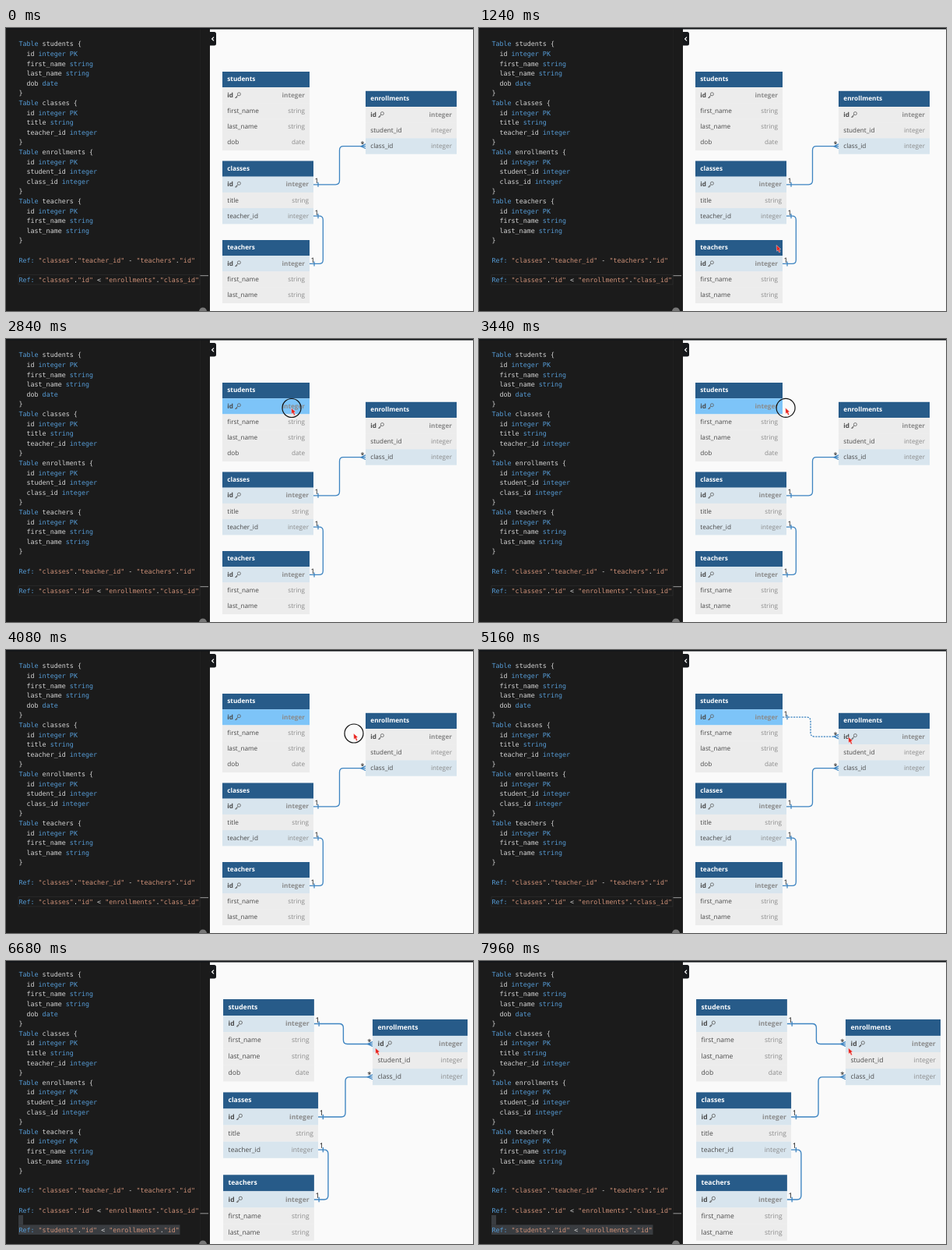
An HTML page for the animation above (8 s loop, 600 px wide and 363 px high).

```html
<!DOCTYPE html>
<html lang="en">
<head>
<meta charset="utf-8">
<title>Schema editor</title>
<style>
  html, body { margin: 0; width: 100%; height: 100%; overflow: hidden; background: #fafafa; }
  svg { display: block; width: 100vw; height: 100vh; }
  text { white-space: pre; text-rendering: geometricPrecision; }
  .code { font: 8.37px "DejaVu Sans Mono", monospace; fill: #d4d4d4; }
  .key { fill: #569cd6; }
  .str { fill: #ce9178; }
  .table text { font: 8.2px "Open Sans", "Noto Sans", sans-serif; fill: #484848; }
  .table .type { fill: #8b8b8b; text-anchor: end; }
  .table .bold { font-weight: 700; }
  .table .title { font-weight: 700; fill: #fff; }
  .wire { fill: none; stroke: #3d84c1; stroke-width: 1.3; }
  .mark { font: 9px "Open Sans", "Noto Sans", sans-serif; fill: #111; text-anchor: middle; }
</style>
</head>
<body>
<svg id="stage" viewBox="0 0 600 363" preserveAspectRatio="none"></svg>
<script>
const LOOP = 8000, ROW = 20.2, LINE = 12.6;
const T = { enter: 960, hover: 1640, press: 2680, target: 4400, drop: 5120, update: 5280 };
const PLAIN = '#ececec', LINKED = '#d8e5ee', ACTIVE = '#7dc4f8';

const stage = document.getElementById('stage');

function add(parent, tag, attrs = {}, text) {
  const el = document.createElementNS('http://www.w3.org/2000/svg', tag);
  for (const k in attrs) el.setAttribute(k, attrs[k]);
  if (text !== undefined) el.textContent = text;
  parent.appendChild(el);
  return el;
}
const rect = (p, x, y, width, height, fill, more) =>
  add(p, 'rect', { x, y, width, height, fill, ...more });
const show = (el, on) => el.setAttribute('visibility', on ? 'visible' : 'hidden');

// Schema
const tables = [
  { name: 'students', x: 278, y: 56, w: 112,
    rows: ['id integer PK', 'first_name string', 'last_name string', 'dob date'], linked: [] },
  { name: 'classes', x: 278, y: 170.5, w: 117,
    rows: ['id integer PK', 'title string', 'teacher_id integer'], linked: [0, 2] },
  { name: 'enrollments', x: 462, y: 80.8, w: 117,
    rows: ['id integer PK', 'student_id integer', 'class_id integer'], linked: [2] },
  { name: 'teachers', x: 278, y: 272, w: 112,
    rows: ['id integer PK', 'first_name string', 'last_name string'], linked: [0] }
];

// Diagram
rect(stage, 262, 0, 338, 363, '#fafafa');
const diagram = add(stage, 'g');

function drawKey(p, x, y) {
  const g = add(p, 'g', { fill: 'none', stroke: '#5c5c5c', 'stroke-width': 0.8 });
  add(g, 'circle', { cx: x + 4.9, cy: y - 1.4, r: 2 });
  add(g, 'path', { d: `M${x + 3.4} ${y}L${x} ${y + 3.4}h1.6v-1.4h1.4` });
}

function drawTable({ name, x, y, w, rows, linked }) {
  const g = add(diagram, 'g', { class: 'table' });
  rect(g, x, y, w, ROW, '#275b89');
  add(g, 'text', { x: x + 6.3, y: y + 12.4, class: 'title' }, name);
  return rows.map((row, i) => {
    const [field, type, pk] = row.split(' ');
    const top = y + ROW * (i + 1), bold = pk ? ' bold' : '';
    const bg = rect(g, x, top, w, ROW + 0.1, linked.includes(i) ? LINKED : PLAIN);
    add(g, 'text', { x: x + 6.3, y: top + 12.6, class: 'field' + bold }, field);
    add(g, 'text', { x: x + w - 6, y: top + 12.6, class: 'type' + bold }, type);
    if (pk) drawKey(g, x + 16.5, top + 10);
    return bg;
  });
}
const rowBoxes = tables.map(drawTable);
const startRow = rowBoxes[0][0], endRow = rowBoxes[2][0];

const tick = (g, x, y) => {
  add(g, 'path', { class: 'wire', d: `M${x + 6} ${y - 3}v6` });
  add(g, 'text', { class: 'mark', x: x + 4.2, y: y - 1.6 }, '1');
};
const manyEnd = (g, x, y) => {
  add(g, 'path', { class: 'wire', d: `M${x} ${y - 2.8}L${x - 6} ${y}L${x} ${y + 2.8}` });
  add(g, 'text', { class: 'mark', x: x - 4, y: y + 0.6 }, '*');
};

// Horizontal - vertical - horizontal wire with rounded corners
function wire(g, x1, y1, xm, x2, y2, r = 5) {
  const v = Math.sign(y2 - y1), a = Math.sign(xm - x1), b = Math.sign(x2 - xm);
  return add(g, 'path', { class: 'wire', d:
    `M${x1} ${y1}H${xm - a * r}Q${xm} ${y1} ${xm} ${y1 + v * r}` +
    `V${y2 - v * r}Q${xm} ${y2} ${xm + b * r} ${y2}H${x2}` });
}
function oneToMany(x1, y1, x2, y2) {
  const g = add(diagram, 'g');
  const path = wire(g, x1, y1, (x1 + x2) / 2, x2, y2);
  tick(g, x1, y1);
  manyEnd(g, x2, y2);
  return { g, path };
}
oneToMany(395, 200.8, 462, 151.7);
const oneToOne = add(diagram, 'g');
wire(oneToOne, 395, 241.2, 407.3, 390, 302.4);
tick(oneToOne, 395, 241.2);
tick(oneToOne, 390, 302.4);
const newRef = oneToMany(390, 86.2, 462, 111.1);

// Editor
const editor = add(stage, 'g');
rect(editor, 0, 0, 262, 363, '#1b1b1b');
rect(editor, 249, 0, 0.6, 363, '#262626');
const lineBorder = rect(editor, 16, 316.6, 233, 12.4, 'none', { stroke: '#2b2b2b', 'stroke-width': 0.8 });
const selection = add(editor, 'g');
rect(selection, 16, 326, 6, 12.6, '#3a3d41');
rect(selection, 16, 338.4, 207.5, 12.6, '#3a3d41');

const source = [];
for (const name of ['students', 'classes', 'enrollments', 'teachers']) {
  const table = tables.find(t => t.name === name);
  source.push(`Table ${name} {`, ...table.rows.map(r => '  ' + r), '}');
}
source.push('', 'Ref: "classes"."teacher_id" - "teachers"."id"',
  '', 'Ref: "classes"."id" < "enrollments"."class_id"',
  '', 'Ref: "students"."id" < "enrollments"."id"');

const code = add(editor, 'g', { class: 'code' });
const codeLines = source.map((line, i) => {
  const el = add(code, 'text', { x: 16.4, y: 23.3 + i * LINE });
  for (const part of line.split(/("[^"]*"|\b(?:Table|Ref:|integer|string|date|PK)(?!\w))/)) {
    if (!part) continue;
    const kind = part[0] === '"' ? 'str' : /^(Table|Ref:|integer|string|date|PK)$/.test(part) ? 'key' : '';
    add(el, 'tspan', kind ? { class: kind } : {}, part);
  }
  return el;
});
const newLine = codeLines[codeLines.length - 1];

const scrollbars = add(editor, 'g', { fill: '#797979', 'fill-opacity': 0.42 });
add(scrollbars, 'rect', { x: 16, y: 345.5, width: 216, height: 8.5 });
add(scrollbars, 'rect', { x: 249.5, y: 2, width: 10, height: 352 });
const rulerMark = rect(editor, 249.5, 317, 10.5, 1.2, '#858585');
add(editor, 'circle', { cx: 253, cy: 363.5, r: 5, fill: '#777' });

// Frame and collapse tab
rect(stage, 0, 0, 600, 1.6, '#111418');
add(stage, 'path', { d: 'M262 5h5.5q2.5 0 2.5 2.5v12.5q0 2.5-2.5 2.5H262z', fill: '#16181b' });
add(stage, 'path', { d: 'M267 11.6l-2.4 2.4 2.4 2.4', fill: 'none', stroke: '#fff', 'stroke-width': 1.2 });

// Pointer
const pointer = add(stage, 'g');
const ring = add(pointer, 'circle', { cx: 0, cy: -0.5, r: 12, fill: 'none', stroke: '#111', 'stroke-width': 1.2 });
add(pointer, 'path', { d: 'M-.5 -.5L5.2 4.6 3.1 5 4.6 8.2 3 8.9 1.6 5.8 0 7.2z',
  fill: '#e8221c', stroke: '#fff', 'stroke-width': 0.4 });

// time, x, y
const track = [
  [960, 392, 366], [1700, 363, 97], [2100, 363, 97], [2600, 367, 89],
  [2900, 367, 89], [3440, 394, 88.8], [4080, 447, 107.5], [4500, 475, 112]
];
function pointerAt(t) {
  let i = 0;
  while (i < track.length - 2 && t > track[i + 1][0]) i++;
  const [t0, x0, y0] = track[i], [t1, x1, y1] = track[i + 1];
  const k = Math.min(1, Math.max(0, (t - t0) / (t1 - t0)));
  const e = i === 5 ? k : k * k * (3 - 2 * k);
  return [x0 + (x1 - x0) * e, y0 + (y1 - y0) * e];
}

function render(t) {
  const updated = t >= T.update, pressed = t >= T.press;
  const over = t >= T.target;

  diagram.setAttribute('transform', updated ? 'matrix(1.043 0 0 1.043 -10.9 -9.4)' : '');
  startRow.setAttribute('fill', updated ? LINKED : pressed ? ACTIVE : t >= T.hover ? LINKED : PLAIN);
  endRow.setAttribute('fill', over ? LINKED : PLAIN);
  show(newRef.g, over);
  newRef.path.setAttribute('stroke-dasharray', updated ? 'none' : '2.2 1.3');

  code.setAttribute('transform', `translate(0 ${updated ? -3.1 : 0})`);
  show(newLine, updated);
  show(selection, updated);
  show(lineBorder, !updated);
  rulerMark.setAttribute('y', updated ? 323.2 : 317);
  show(scrollbars, updated);
  scrollbars.setAttribute('opacity', 1 - Math.min(1, Math.max(0, (t - 5600) / 320)));

  show(pointer, t >= T.enter);
  ring.setAttribute('opacity', pressed && t < T.drop ? 1 : 0);
  pointer.setAttribute('transform', `translate(${pointerAt(t)})`);
}

const begin = performance.now();
function tickFrame() {
  render((performance.now() - begin) % LOOP);
  requestAnimationFrame(tickFrame);
}
tickFrame();
</script>
</body>
</html>
```
